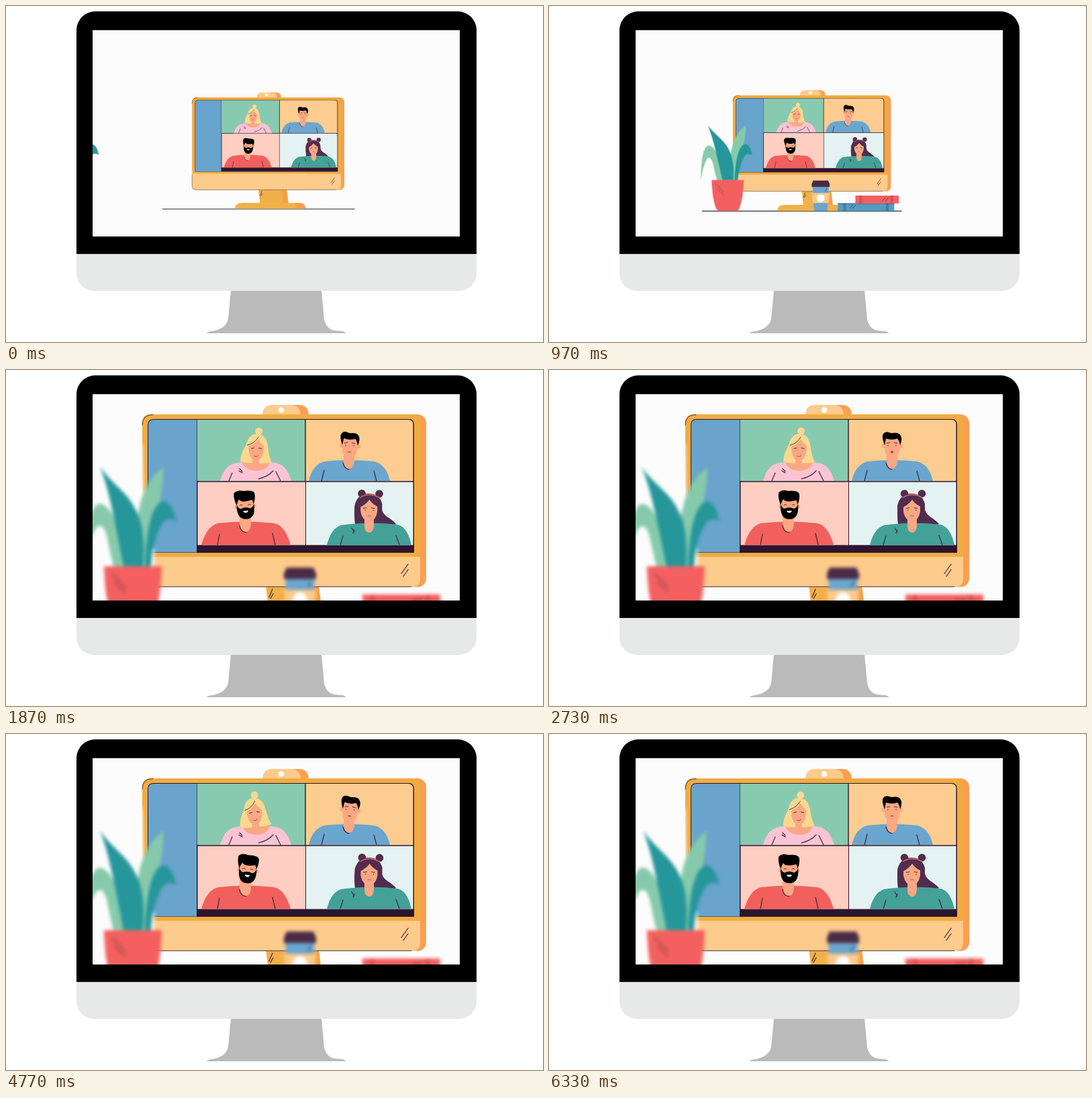
An HTML page for the animation above (6360 ms loop, 800 by 500 pixels).

```html
<!DOCTYPE html>
<html lang="en">
<head>
<meta charset="utf-8">
<title>Video call on a desktop</title>
<style>
html, body { margin: 0; width: 100%; height: 100%; overflow: hidden; background: #fff; }
svg { display: block; width: 800px; height: 500px; }
.ink { fill: none; stroke: #3b2638; stroke-width: 1.2; stroke-linecap: round; }
.thin { stroke-width: .9; }
.skin { fill: #f9a883; }
.blond { fill: #fbd88f; }
.plum { fill: #512c4e; }
.dark { fill: #25969a; }
.light { fill: #86caab; }
</style>
</head>
<body>
<svg viewBox="0 0 800 500">
  <defs>
    <clipPath id="glass"><rect x="129" y="36" width="547" height="307"/></clipPath>
    <filter id="soft" filterUnits="userSpaceOnUse" x="50" y="60" width="700" height="370" color-interpolation-filters="sRGB">
      <feGaussianBlur id="blur" stdDeviation="0"/>
    </filter>
  </defs>

  <path fill="#b9bab9" d="M335 423H470L474 466Q477 481 490 483L501 484Q506 485 506 487H299Q300 485 306 484Q327 481 331 466Z"/>
  <path fill="#e7e9e8" d="M105 368H701V398A26 26 0 0 1 675 424H131A26 26 0 0 1 105 398Z"/>
  <path fill="#000" d="M105 369V36A28 28 0 0 1 133 8H673A28 28 0 0 1 701 36V369Z"/>
  <rect x="129" y="36" width="547" height="307" fill="#fcfcfc"/>

  <g clip-path="url(#glass)">
    <g id="scene">
      <path stroke="#4b5554" stroke-width="2.4" d="M120 375.7H655"/>

      <g id="monitor">
        <path fill="#f5a049" d="M448 320H466L471 362H450Z"/>
        <path fill="#f2b04a" d="M387 320H452L456 362H392Z"/>
        <path fill="#f2b04a" d="M322 375Q322 359 342 359H498V375Z"/>
        <path fill="#f5a049" d="M488 359H505Q518 360 518 375H494Z"/>
        <path class="ink" d="M392 338L397 326M394 340L398 333"/>
        <path fill="#fa9f50" d="M420 52H436Q451 52 451 68H420Z"/>
        <path fill="#fdcb8b" d="M382 68Q382 52 397 52H424Q439 52 439 68Z"/>
        <circle cx="410" cy="59.5" r="4.2" fill="#fff"/>
        <rect x="520" y="66" width="106" height="257" rx="13" fill="#fa9f50"/>
        <path fill="#f1ab42" d="M203 278V79Q203 66 216 66H605Q617 66 617 79V278Z"/>
        <path fill="#fdcb8b" d="M203 278H617V311Q617 323 605 323H215Q203 323 203 311Z"/>
        <path class="ink thin" d="M219 66.5Q203 66 203 82M203 280V311Q203 322.6 215 322.6H604"/>
        <path fill="#2d1530" d="M211 272V82Q211 73 220 73H600Q608 73 608 82V272Z"/>
        <path fill="#68a4cb" d="M212 271.5V82Q212 74 220 74H284V271.5Z"/>
        <path fill="#88cab0" d="M284.7 74H445.3V165.3H284.7Z"/>
        <path fill="#fdcc90" d="M446.7 74H599Q606.5 74 606.5 81V165.3H446.7Z"/>
        <path fill="#fdcec1" d="M285.5 166.7H446V260.5H285.5Z"/>
        <path fill="#e5f2f2" d="M447 166.7H606.5V260.5H447Z"/>
        <path class="ink" d="M589 303L599 289M592 307L599 297"/>

        <!-- top left -->
        <path fill="#fbc3d4" d="M319 165Q325 141 344 138Q372 134 400 138Q418 140 425 165Z"/>
        <path class="skin" d="M352 137Q372 133 393 137Q389 150 372 150Q356 149 352 137Z"/>
        <path class="ink" d="M332 165L337 153M409 165L402 151M348 147L352 151M347 150L352 153M376 162Q390 159 398 150"/>
        <g id="blonde">
          <circle cx="375.5" cy="91" r="5.4" class="blond"/>
          <path class="blond" d="M372 95C386 95 389 107 390 117Q392 130 396 137Q383 140 372 138Q358 140 349 136Q349 125 357 112Q360 96 372 95Z"/>
          <path class="skin" d="M367 126H377V142H367Z"/>
          <path class="skin" d="M361 114Q370 111 375 103Q380 111 384 114Q383 134 372 135Q361 133 361 114Z"/>
          <path class="ink thin" d="M375 100Q369 110 359 112M365 117L369 116M376 116L380 117"/>
          <path fill="none" stroke="#d95b60" stroke-width="1.3" d="M369 128Q373 130 376 127"/>
        </g>

        <!-- top right -->
        <path fill="#6aa6ce" d="M451 165Q457 139 476 136Q511 132 547 136Q566 139 572 165Z"/>
        <path class="skin" d="M503 120H519V137Q517 147 511 147Q504 146 503 137Z"/>
        <path class="ink" d="M470 165L474 149M552 165L548 150M502 138Q504 147 511 148"/>
        <g id="brunet">
          <circle cx="499" cy="113" r="3.2" class="skin"/><circle cx="524" cy="113" r="3.2" class="skin"/>
          <path class="skin" d="M500 103Q511 99 523 103V117Q522 130 511 131Q501 130 500 117Z"/>
          <path d="M500 112Q495 99 498 95Q501 90 510 94Q522 92 524 98Q527 103 523 112Q522 105 519 102Q510 105 502 102Z"/>
          <path class="ink thin" d="M503 109L508 108M514 108L519 109M505 112V113M517 112V113"/>
          <ellipse id="mouth" cx="511" cy="122" rx="3" ry="1" fill="#b4443f"/>
        </g>

        <!-- bottom left -->
        <path fill="#f1605d" d="M291 260.5Q299 232 316 228Q357 223 399 228Q416 231 424 260.5Z"/>
        <path class="skin" d="M348 216H365V230Q364 241 357 241Q349 240 348 230Z"/>
        <path class="ink" d="M315 260L318 244M401 260L397 243M348 231Q349 241 358 242"/>
        <g id="bearded">
          <circle cx="345" cy="203" r="3" class="skin"/><circle cx="371" cy="203" r="3" class="skin"/>
          <path class="skin" d="M346 190H370V208H346Z"/>
          <path d="M345 201Q341 190 342 183Q346 177 357 180Q372 179 373 185Q374 193 370 201Q370 195 368 194Q352 198 349 192Q347 195 345 201Z"/>
          <path d="M345 200Q348 207 352 206Q358 203 364 206Q368 207 371 200Q373 222 358 222Q344 222 345 200Z"/>
          <path fill="#fff" d="M354 209.5H362Q361 212.5 358 212.5Q355 212.5 354 209.5Z"/>
          <path class="ink thin" d="M350 201Q352 199 354 201M362 201Q364 199 366 201"/>
        </g>

        <!-- bottom right -->
        <path class="plum" d="M520 230Q518 215 520 202H559C560 219 572 218 581 229Q572 236 558 231Z"/>
        <g id="buns" class="plum">
          <path d="M519 217V202Q523 184 540 184Q556 184 560 199V217Z"/>
          <circle cx="529.5" cy="184" r="5.8"/><circle cx="555.5" cy="184" r="5.8"/>
        </g>
        <path fill="#43a198" d="M478 260.5Q484 236 499 231Q541 225 583 230Q598 233 604 260.5Z"/>
        <path class="skin" d="M534 217H548V232Q547 242 541 242Q534 241 534 232Z"/>
        <path class="ink" d="M498 260L502 247M586 260L581 246M515 235L519 241M517 243L519 238"/>
        <g id="face">
          <path class="skin" d="M528 204Q536 200 541 193Q546 200 553 203V210Q551 224 541 225Q530 224 528 210Z"/>
          <path fill="none" stroke="#e8665f" stroke-width="1.4" d="M527 190Q541 181 556 190"/>
          <path class="ink thin" d="M532 206L537 205M544 205L549 206M535 208V209M547 208V209"/>
          <path fill="none" stroke="#d95b60" stroke-width="1.2" d="M538 217H544"/>
        </g>
      </g>

      <g id="blueBook" filter="url(#soft)">
        <rect x="484" y="355" width="151" height="20" fill="#559bc0"/>
        <path fill="#3d7fa5" d="M499 355H506V375H499ZM613 355H620V375H613Z"/>
        <path class="ink" d="M517 368L523 360M525 368L531 360M484 355.5H635"/>
      </g>
      <g id="redBook" filter="url(#soft)">
        <rect x="531" y="334" width="116" height="21" fill="#f1615f"/>
        <path fill="#d84f52" d="M542 334H549V355H542ZM625 334H632V355H625Z"/>
        <path class="ink" d="M604 348L611 340M612 348L619 340"/>
      </g>
      <g id="cup" filter="url(#soft)">
        <path fill="#6aa6ce" d="M416 309H460L456 375H420Z"/>
        <path fill="#fdc98b" d="M414 327H462L459 354H417Z"/>
        <circle cx="438" cy="341" r="10.5" fill="#fff"/>
        <path fill="#4b2a46" d="M418 294H458L462 303V311H414V303Z"/>
        <path class="ink" d="M450 323L454 315"/>
      </g>

      <g id="plant" filter="url(#soft)">
        <path id="halo" fill="#fcfcfc" d="M192 110H203L206 264H221V328H192Z"/>
        <path id="leafLeft" class="light" d="M117 297Q118 202 139 199C160 202 171 244 180 292H160Q155 272 150 248Q144 226 134 235Q121 258 117 297Z"/>
        <path id="leafRight" class="light" d="M236 145C213 162 201 186 196 224L194 292H207Q209 257 222 222Q235 190 236 145Z"/>
        <path id="leafDroop" class="dark" d="M207 292Q211 204 233 196Q247 194 254 225Q240 216 231 232Q218 257 216 292Z"/>
        <path id="leafSpike" class="dark" d="M138 144C151 176 159 214 175 292H204Q208 240 194 212C182 183 155 170 138 144Z"/>
        <path fill="#f3605f" d="M146 292H232Q231 341 220 368Q217 375 210 375H168Q160 375 157 367Q147 339 146 292Z"/>
        <path class="ink" d="M157 303L178 324M162 316L177 331" opacity=".65"/>
      </g>
    </g>
  </g>
</svg>
<script>
const LOOP = 6360;
const $ = id => document.getElementById(id);
const clamp = x => Math.min(1, Math.max(0, x));
const span = (t, from, to) => clamp((t - from) / (to - from));
const easeOut = u => 1 - (1 - u) ** 3;
const easeInOut = (u, n) => u < .5 ? (2 * u) ** n / 2 : 1 - (2 - 2 * u) ** n / 2;

// Smooth track through [time, value] pairs
function track(t, keys) {
  const i = keys.findIndex(k => k[0] > t);
  if (i < 0) return keys[keys.length - 1][1];
  const [t0, a] = keys[i - 1], [t1, b] = keys[i];
  const u = span(t, t0, t1);
  return a + (b - a) * u * u * (3 - 2 * u);
}

const move = (id, x, y) => $(id).setAttribute('transform', `translate(${x} ${y})`);
const turn = (id, deg, x, y) => $(id).setAttribute('transform', `rotate(${deg} ${x} ${y})`);

// Pivot and lean in degrees
const heads = [
  { ids: ['blonde'], at: [372, 138], keys: [[0, 1.2], [1200, 2.4], [2730, 0], [4070, -6], [5470, -7], [6330, -1]] },
  { ids: ['brunet'], at: [511, 130], keys: [[0, 0], [1200, 5], [2730, 0], [4070, 3.6], [5470, 7], [6330, 0]] },
  { ids: ['bearded'], at: [357, 225], keys: [[0, 4.3], [1430, -5], [2730, 0], [4070, 4.3], [5470, 7], [6330, 0]] },
  { ids: ['buns', 'face'], at: [541, 228], keys: [[0, -1], [1430, 1], [2730, 0], [4070, -3], [5470, 5.5], [6330, 0]] }
];
const sway = [[0, 0], [970, -.4], [1430, .35], [2730, 0], [4070, -1], [5470, 1.5], [6330, .3]];
const leaves = [['leafLeft', 1.5], ['leafRight', -2.2], ['leafDroop', -1.5], ['leafSpike', 2.8]];

function draw(t) {
  const zoom = easeInOut(span(t, 603, 1956), 4);
  const scale = .536 + .464 * zoom;
  $('scene').setAttribute('transform', `translate(363 217) scale(${scale}) translate(-363 -217)`);
  $('blur').setAttribute('stdDeviation', 2.7 * clamp((zoom - .06) * 1.3));
  $('halo').setAttribute('opacity', clamp(zoom * 1.3 - .1));

  move('plant', -312 * (1 - easeOut(span(t, 0, 600))), 0);
  move('blueBook', 480 * (1 - easeInOut(span(t, 50, 620), 3)), 0);
  move('redBook', 420 * (1 - easeInOut(span(t, 450, 930), 3)), 0);
  move('cup', 0, -500 * (1 - easeOut(span(t, 640, 940))));

  for (const { ids, at, keys } of heads)
    for (const id of ids) turn(id, track(t, keys), ...at);
  const bend = track(t, sway);
  for (const [id, amount] of leaves) turn(id, bend * amount, 190, 292);

  const talk = track(t, [[0, 0], [2300, 0], [2700, 1], [3100, 0], [6360, 0]]);
  $('mouth').setAttribute('rx', 3 - talk);
  $('mouth').setAttribute('ry', .8 + 1.2 * talk);
}

const start = performance.now();
function tick() {
  draw((performance.now() - start) % LOOP);
  requestAnimationFrame(tick);
}
draw(0);
requestAnimationFrame(tick);
</script>
</body>
</html>
```
